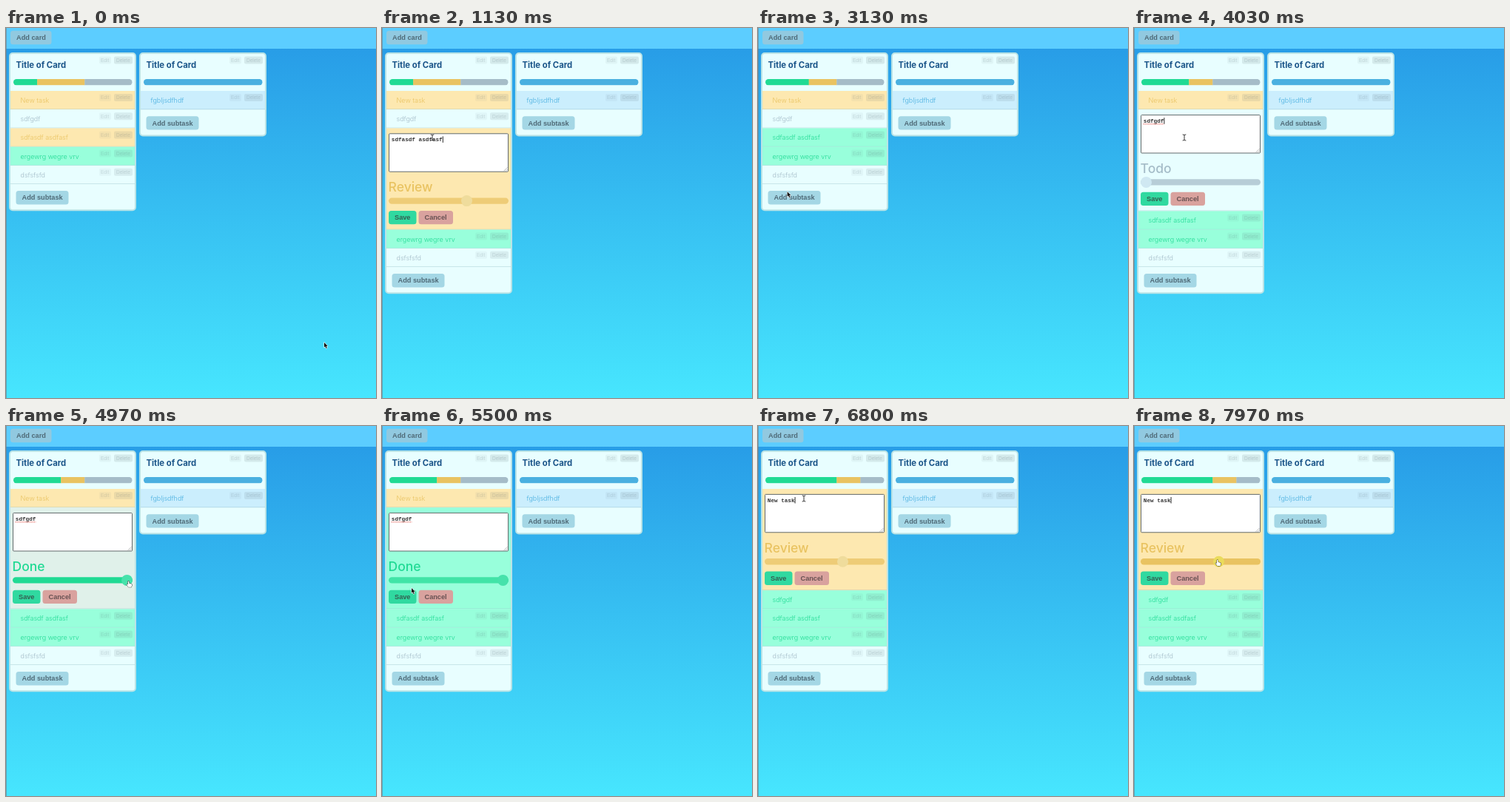
Write an HTML page with a canvas that moves like this. It is 500 px wide and 500 px high and loops after 8 s.

```html
<!DOCTYPE html>
<html lang="en">
<head>
<meta charset="utf-8">
<title>Task cards</title>
<style>
html, body { margin: 0; height: 100%; overflow: hidden; background: #36bff0; }
canvas { display: block; width: 500px; height: 500px; }
</style>
</head>
<body>
<canvas id="stage"></canvas>
<script>
const LOOP = 8000, ROW = 25.2, EXTRA = 112, ROWS_TOP = 85;
const SANS = 'Inter, sans-serif', ARIAL = '"Liberation Sans", Arial, sans-serif';
const MONO = 'bold 7.67px "Liberation Mono", monospace';

// Todo, Doing, Review, Done
const STATES = [
  { name: 'Todo', ink: '#a5bcc8', bg: [232, 254, 255], thumb: '#cfe8f2' },
  { name: 'Doing', ink: '#4ab0e0', bg: [203, 238, 253], thumb: '#8fd0ee' },
  { name: 'Review', ink: '#e9c361', bg: [253, 232, 176], thumb: '#efdc9c' },
  { name: 'Done', ink: '#20da94', bg: [152, 255, 219], thumb: '#46e2ab' }
];
const TASKS = ['New task', 'sdfgdf', 'sdfasdf asdfasf', 'ergewrg wegre vrv', 'dsfsfsfd'];
const START = [2, 0, 2, 3, 0];
const EDITS = [
  { row: 2, open: 1100, blur: 1930, save: 2800, steps: [[2130, 3]] },
  { row: 1, open: 3780, blur: 4620, save: 5700, steps: [[4720, 1], [4830, 2], [4960, 3]] },
  { row: 0, open: 6790, blur: LOOP, save: LOOP, steps: [] }
];
const PATH = [
  [30, 430, 425], [600, 66, 120], [830, 68, 148], [1350, 68, 148], [1800, 114, 233],
  [1950, 114, 233], [2200, 168, 236], [2290, 168, 236], [2430, 111, 235], [2700, 32, 255],
  [2950, 32, 255], [3500, 62, 122], [3630, 68, 122], [3800, 68, 122], [4000, 68, 148],
  [4150, 68, 148], [4500, 17, 208], [4630, 17, 208], [5050, 181, 211], [5180, 181, 211],
  [5500, 40, 219], [5650, 30, 230], [6270, 30, 230], [6600, 62, 98], [7630, 62, 98],
  [7930, 113, 182]
];

const canvas = document.getElementById('stage'), ctx = canvas.getContext('2d');
const dpr = window.devicePixelRatio || 1;
canvas.width = canvas.height = 500 * dpr;

const clamp = v => Math.max(0, Math.min(1, v));
const ease = v => { v = clamp(v); return v * v * (3 - 2 * v); };
const mix = (a, b, k) => a + (b - a) * k;
const css = c => `rgb(${c.map(Math.round)})`;

function cursorAt(t) {
  const i = PATH.findIndex(p => p[0] > t);
  if (i === 0) return PATH[0].slice(1);
  if (i < 0) return PATH[PATH.length - 1].slice(1);
  const a = PATH[i - 1], b = PATH[i], k = ease((t - a[0]) / (b[0] - a[0]));
  return [mix(a[1], b[1], k), mix(a[2], b[2], k)];
}

function rowLook(row, t) {
  let state = START[row], bg = STATES[state].bg;
  const edit = EDITS.find(e => e.row === row);
  for (const [at, next] of edit ? edit.steps : []) {
    if (t < at) break;
    const k = ease((t - at) / 430);
    bg = bg.map((v, i) => mix(v, STATES[next].bg[i], k));
    state = next;
  }
  return { state, bg: css(bg) };
}

function rect(x, y, w, h, fill) {
  ctx.fillStyle = fill;
  ctx.fillRect(x, y, w, h);
}
function box(x, y, w, h, r, fill, stroke, line = 1) {
  ctx.beginPath();
  ctx.roundRect(x, y, w, h, r);
  if (fill) { ctx.fillStyle = fill; ctx.fill(); }
  if (stroke) { ctx.strokeStyle = stroke; ctx.lineWidth = line; ctx.stroke(); }
}
function text(s, x, y, font, fill) {
  ctx.font = font;
  ctx.fillStyle = fill;
  ctx.fillText(s, x, y);
}
function button(s, x, y, w, fill, ink = '#4f6a77') {
  box(x, y, w, 18.4, 3.5, fill);
  text(s, x + 8, y + 12.4, 'bold 9.2px ' + ARIAL, ink);
}

function tools(x, y, hover) {
  const fade = 1 + hover;
  ctx.globalAlpha = 0.05 * fade;
  box(x + 122, y - 5, 16, 10, 2, '#50666c');
  ctx.globalAlpha = 0.11 * fade;
  box(x + 142, y - 5, 25, 10, 2, '#50666c');
  ctx.globalAlpha = 0.2 * fade;
  text('Edit', x + 124, y + 2.3, '6.5px ' + ARIAL, '#50666c');
  text('Delete', x + 145, y + 2.3, '6.5px ' + ARIAL, '#50666c');
  ctx.globalAlpha = 1;
}

function card(x, bottom) {
  box(x + 1, 34, 170, bottom - 35, 4, '#e8feff', '#b9e3e6', 2);
  text('Title of Card', x + 9.5, 54, 'bold 11.3px ' + SANS, '#1b5589');
  tools(x, 43.5, 0.2);
  button('Add subtask', x + 9.5, bottom - 27.2, 71, '#a4d7e5');
}

function bar(x, parts) {
  ctx.save();
  ctx.beginPath();
  ctx.roundRect(x, 69, 160.5, 8.4, 4.2);
  ctx.clip();
  for (const [count, fill] of parts) {
    rect(x, 69, count * 32.1 + 0.3, 8.4, fill);
    x += count * 32.1;
  }
  ctx.restore();
}

function taskRow(x, y, name, look, hover) {
  rect(x + 2, y, 168, ROW, look.bg);
  rect(x + 2, y + ROW - 0.8, 168, 0.8, 'rgba(130,175,185,.4)');
  text(name, x + 15.5, y + 16, '300 9px ' + SANS, STATES[look.state].ink);
  tools(x, y + 9, hover);
}

const thumbX = state => 16.5 + state * 49;

function editor(y, edit, look, t, [mx, my]) {
  const s = STATES[look.state], name = TASKS[edit.row], age = t - edit.open;
  rect(6, y, 168, ROW + EXTRA, look.bg);
  rect(6, y + ROW + EXTRA - 0.8, 168, 0.8, 'rgba(130,175,185,.45)');

  box(9.5, y + 7.4, 161, 51.4, 1, '#fff', '#626a6c');
  text(name, 12.8, y + 18, MONO, '#333');
  if (age > 180 && edit.row) squiggles(name, y + 19.6);
  if (t < edit.blur && age % 1000 < 500 + 200 * (age > 1000)) {
    rect(12.8 + name.length * 4.6, y + 11, 0.9, 8.5, '#111');
  }
  ctx.strokeStyle = '#8a8a8a';
  ctx.lineWidth = 0.6;
  for (const d of [2.5, 5]) {
    ctx.beginPath();
    ctx.moveTo(169.5 - d, y + 58);
    ctx.lineTo(169.5, y + 58 - d);
    ctx.stroke();
  }

  text(s.name, 8.6, y + 86, '500 17.5px ' + SANS, s.ink);
  const hover = mx > 9 && mx < 171 && Math.abs(my - y - 98) < 7;
  ctx.globalAlpha = hover ? 1 : 0.72;
  box(9, y + 94, 162, 8.4, 4.2, s.ink);
  ctx.globalAlpha = 1;
  const lit = hover && look.state === 2 ? '#eadb5c' : s.thumb;
  ctx.beginPath();
  ctx.arc(thumbX(look.state), y + 98.2, 7.5, 0, 7);
  ctx.fillStyle = lit;
  ctx.fill();

  button('Save', 9, y + 111.5, 37.5, '#30d9a0', '#355f52');
  button('Cancel', 49.5, y + 111.5, 46.5, '#d9a29e', '#685253');
}

function squiggles(s, y) {
  let x = 12.8;
  ctx.strokeStyle = '#e04a40';
  ctx.lineWidth = 1;
  ctx.setLineDash([1.2, 0.9]);
  for (const word of s.split(' ')) {
    ctx.beginPath();
    ctx.moveTo(x, y);
    ctx.lineTo(x + word.length * 4.6, y);
    ctx.stroke();
    x += (word.length + 1) * 4.6;
  }
  ctx.setLineDash([]);
}

function shape(points, x, y) {
  ctx.beginPath();
  points.forEach(([px, py]) => ctx.lineTo(x + px, y + py));
  ctx.closePath();
  ctx.lineJoin = 'round';
}
function pointer(kind, x, y) {
  if (kind === 'beam') {
    ctx.strokeStyle = '#333';
    ctx.lineWidth = 1;
    ctx.beginPath();
    for (const d of [-1, 1]) {
      ctx.moveTo(x - 2.3, y + d * 4);
      ctx.quadraticCurveTo(x, y + d * 4, x, y + d * 3);
      ctx.quadraticCurveTo(x, y + d * 4, x + 2.3, y + d * 4);
    }
    ctx.moveTo(x, y - 3.5);
    ctx.lineTo(x, y + 3.5);
    ctx.stroke();
    return;
  }
  const hand = kind === 'hand';
  shape(hand
    ? [[-1, -1], [0.5, -1], [0.7, 2], [4, 2.7], [4.5, 4], [3.6, 7], [-0.4, 7], [-3, 3.6], [-2, 2.9], [-1, 4]]
    : [[0, 0], [0, 6.6], [1.5, 5.3], [2.6, 8], [3.8, 7.5], [2.7, 4.9], [4.7, 4.8]], x, y);
  ctx.strokeStyle = hand ? '#222' : '#fff';
  ctx.lineWidth = hand ? 0.9 : 1.1;
  ctx.stroke();
  ctx.fillStyle = hand ? '#fff' : '#111';
  ctx.fill();
}

function draw(t) {
  ctx.setTransform(dpr, 0, 0, dpr, 0, 0);
  const sky = ctx.createLinearGradient(0, 28, 0, 500);
  sky.addColorStop(0, '#289de7');
  sky.addColorStop(1, '#47e6fe');
  rect(0, 0, 500, 500, sky);
  rect(0, 0, 500, 28, '#5ccdff');
  rect(0, 0, 0.8, 500, 'rgba(100,125,140,.75)');
  button('Add card', 6, 3.8, 55.5, '#91c9e0');

  const mouse = cursorAt(t);
  const active = EDITS.find(e => t >= e.open && t < e.save);
  card(4, active ? 359.2 : 247.2);
  const saved = EDITS.map(e => ease((t - e.save) / 450));
  const done = 1 + saved[0] + saved[1], review = 2 - saved[0];
  bar(10, [[done, STATES[3].ink], [review, STATES[2].ink], [5 - done - review, STATES[0].ink]]);

  let y = ROWS_TOP, kind = 'arrow';
  TASKS.forEach((name, row) => {
    const look = rowLook(row, t);
    if (active && active.row === row) {
      editor(y, active, look, t, mouse);
      const [mx, my] = mouse;
      if (mx > 9 && mx < 171 && my > y + 7 && my < y + 59) kind = 'beam';
      if (Math.hypot(mx - thumbX(look.state), my - y - 98) < 9) kind = 'hand';
      y += EXTRA;
    } else {
      let hover = 0;
      for (let lag = 0; lag < 200; lag += 40) {
        const [px, py] = cursorAt(t - lag);
        if (px > 6 && px < 174 && py >= y && py < y + ROW) hover += 0.2;
      }
      taskRow(4, y, name, look, hover);
    }
    y += ROW;
  });

  card(180, 146.4);
  bar(186, [[5, STATES[1].ink]]);
  taskRow(180, ROWS_TOP, 'fgbljsdfhdf', { state: 1, bg: css(STATES[1].bg) }, 0);
  pointer(kind, ...mouse);
}

const begin = performance.now();
function frame() {
  draw((performance.now() - begin) % LOOP);
  requestAnimationFrame(frame);
}
frame();
</script>
</body>
</html>
```
